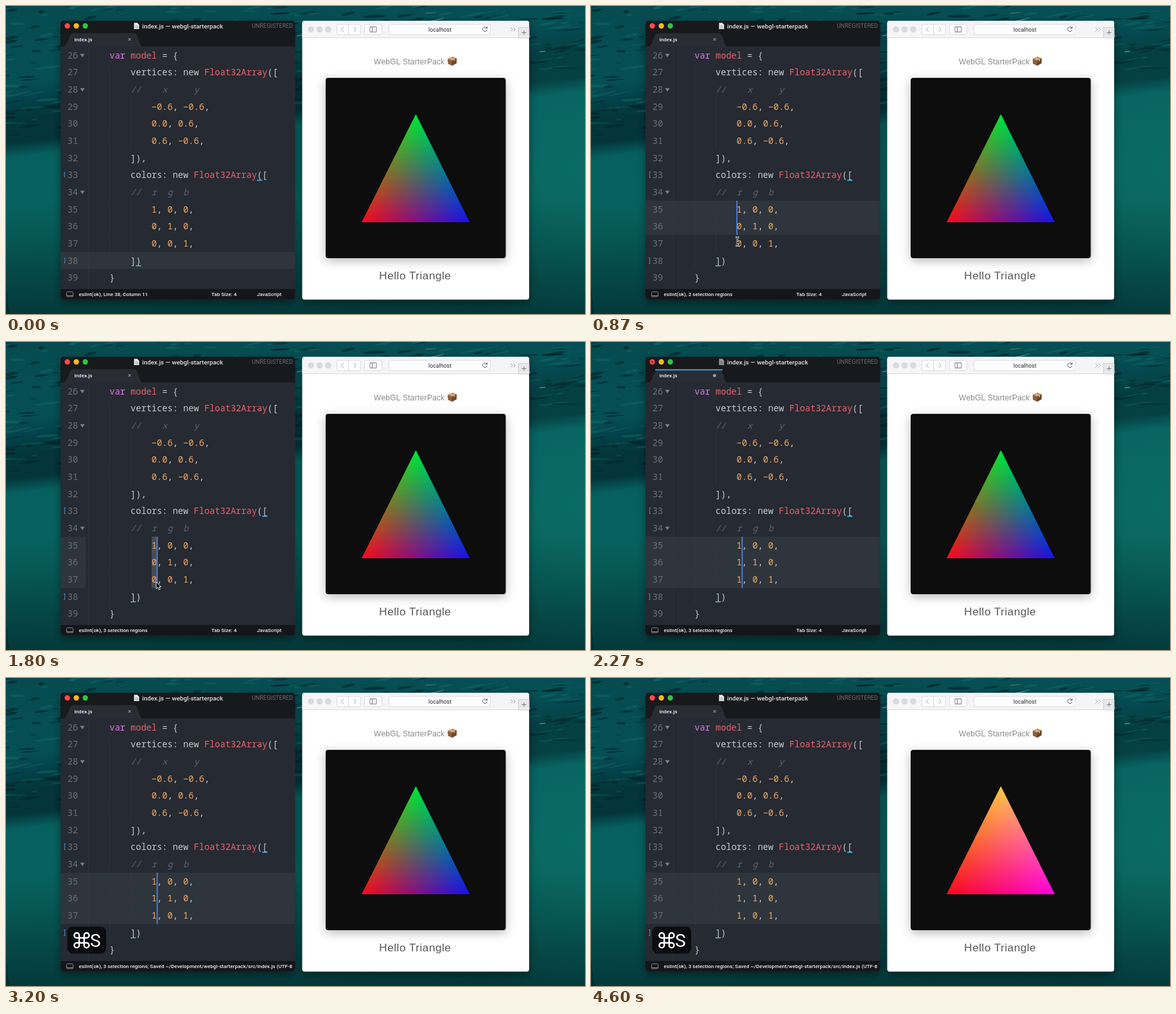
An HTML page with a canvas that plays this animation: 902 by 480 pixels, repeating every 4670 ms.

```html
<!DOCTYPE html>
<html lang="en">
<head>
<meta charset="utf-8">
<title>Hello Triangle</title>
<style>
  html, body { margin: 0; width: 902px; height: 480px; overflow: hidden; background: #043b40; }
  canvas, svg { position: absolute; left: 0; top: 0; }
  .gl { left: 498px; top: 112px; }
  text { font-family: Roboto, sans-serif; white-space: pre; }
  .code text { font: 13.68px "Noto Sans Mono", monospace; fill: #c5c9d2; }
  .code .num { fill: #6c7079; }
  .code .var { fill: #dc7ae6; }
  .code .name { fill: #ee606b; }
  .code .lit { fill: #f3a963; }
  .code .note { fill: #60646d; font-style: italic; }
  .code .mark { fill: #4aa3dc; font-size: 10px; }
  .hl { fill: #2e353c; }
  .ui { font-size: 8.1px; font-weight: 500; fill: #eceef0; }
  .page { font-family: "Liberation Sans", Arial, sans-serif; }
</style>
</head>
<body>
<canvas id="sea" width="902" height="480"></canvas>
<svg id="stage" width="902" height="480" viewBox="0 0 902 480">
  <defs>
    <filter id="shadow" x="-20%" y="-20%" width="140%" height="140%">
      <feDropShadow dx="0" dy="5" stdDeviation="7" flood-color="#000" flood-opacity=".4"/>
    </filter>
    <filter id="soft" x="-20%" y="-20%" width="140%" height="140%">
      <feDropShadow dx="0" dy="4" stdDeviation="8" flood-color="#000" flood-opacity=".28"/>
    </filter>
    <clipPath id="win"><rect x="85" y="23" width="365.5" height="434.5" rx="5"/></clipPath>
    <clipPath id="bar"><rect x="85" y="441" width="361" height="17"/></clipPath>
  </defs>

  <!-- editor -->
  <rect x="85" y="23" width="365.5" height="434.5" rx="5" fill="#282a32" filter="url(#shadow)"/>
  <g clip-path="url(#win)">
    <rect x="85" y="23" width="366" height="40" fill="#18191d"/>
    <path d="M90 63C97 62 97 43 104 42.500H200C207 43 206 62 213 63Z" fill="#292c34"/>
    <path d="M100 43.300H205" stroke="#3fa9f0" stroke-width="1.800" data-on="2050-3000"/>
    <g id="code" class="code"></g>
    <rect x="85" y="441" width="366" height="17" fill="#15161a"/>
  </g>
  <circle cx="95.500" cy="31" r="4.200" fill="#fc4b48"/>
  <circle cx="95.500" cy="31" r="1.500" fill="#7d1412" data-on="2050-3000"/>
  <circle cx="109.500" cy="31" r="4.200" fill="#fdb827"/>
  <circle cx="123.500" cy="31" r="4.200" fill="#29c940"/>
  <g id="doc">
    <path d="M199.500 26.300H204.500L207.300 29.100V36H199.500Z" fill="#eef0f2"/>
    <path d="M201 30.300H205M201 32.300H206M201 34.300H206" stroke="#888b90" stroke-width=".8"/>
  </g>
  <text x="212" y="34.500" font-size="9.800" font-weight="500" fill="#dfe1e4">index.js — webgl-starterpack</text>
  <text x="383" y="34.300" font-size="9" fill="#6b6d72">UNREGISTERED</text>
  <text x="106.500" y="54.800" class="ui">index.js</text>
  <path d="M190.500 50L194.500 54M194.500 50L190.500 54" stroke="#b4b7bc" data-on="0-2050 3000-4670"/>
  <circle cx="192.500" cy="52.200" r="2.500" fill="#9a9da3" data-on="2050-3000"/>
  <rect x="94.500" y="445.500" width="10" height="7.500" rx="1" fill="none" stroke="#85888e"/>
  <path d="M95 451.500H104" stroke="#85888e"/>
  <g id="status" clip-path="url(#bar)"></g>

  <!-- browser -->
  <rect x="461.500" y="23" width="353.500" height="434.500" rx="4" fill="#fff" filter="url(#shadow)"/>
  <path d="M461.500 50V27A4 4 0 0 1 465.500 23H811A4 4 0 0 1 815 27V50Z" fill="#f5f4f6"/>
  <path d="M461.500 49.500H815" stroke="#dcdbdd"/>
  <g fill="#dad9db" stroke="#cccbcd" stroke-width=".6">
    <circle cx="475" cy="36.500" r="4.200"/><circle cx="488.500" cy="36.500" r="4.200"/><circle cx="502" cy="36.500" r="4.200"/>
  </g>
  <g fill="#fdfdfd" stroke="#dddce0">
    <rect x="515.500" y="28.500" width="37" height="16" rx="2.500"/>
    <rect x="558.500" y="28.500" width="27" height="16" rx="2.500"/>
    <rect x="596.500" y="28.500" width="158" height="16" rx="2.500"/>
    <path d="M533.500 29V44"/>
  </g>
  <g fill="none" stroke="#7d7d81">
    <path d="M526 33L522.500 36.500L526 40M542 33L545.500 36.500L542 40" stroke="#a2a2a6"/>
    <path d="M567 32.500H577V40.500H567ZM570.500 32.500V40.500"/>
    <path d="M749 34.300A3.500 3.500 0 1 0 749.500 37M749.500 32V34.800H746.700" stroke="#5d5d61"/>
    <path d="M786 33.500L789 36.500L786 39.500M790.500 33.500L793.500 36.500L790.500 39.500" stroke="#a2a2a6"/>
  </g>
  <path d="M798.500 50V33.500H815V50Z" fill="#e9e8ea" stroke="#d2d1d4"/>
  <path d="M803.500 41.500H810.500M807 38V45" stroke="#77777b"/>
  <rect id="load" x="597.500" y="43" height="1.800" fill="#3d9cf0" data-on="3450-4050"/>
  <text x="676" y="39.800" font-size="8.800" text-anchor="middle" fill="#2c2c2e">localhost</text>
  <text class="page" x="573" y="90.500" font-size="12" letter-spacing=".27" fill="#87888c">WebGL StarterPack</text>
  <path d="M688 82.500L695.500 79L702 81.500V89L695 93L688.500 90Z" fill="#8c5a38"/>
  <path d="M688 82.500L695.500 79L702 81.500L695 85.500Z" fill="#c69466"/>
  <path d="M695 85.500L702 81.500V89L695 93Z" fill="#6f4328"/>
  <path d="M691 81.200L698 84V86.500L699.300 85.700V83.200L692.700 80.400Z" fill="#e2c08f"/>
  <rect x="498" y="112" width="280.500" height="281" rx="4" fill="#08080b" filter="url(#soft)"/>
  <text class="page" x="581.300" y="426.300" font-size="17.200" letter-spacing=".5" fill="#56575b">Hello Triangle</text>
</svg>
<canvas class="gl" width="281" height="281" data-on="0-3620"></canvas>
<canvas class="gl" width="281" height="281" data-on="3620-4670"></canvas>
<svg width="902" height="480" viewBox="0 0 902 480">
  <g id="keys" data-on="2960-4670">
    <rect x="95.500" y="387.500" width="60.500" height="42" rx="8" fill="#08090b" fill-opacity=".9"/>
    <path transform="translate(102.500 393.500) scale(1.28)" fill="none" stroke="#fff" stroke-width="1.900"
      d="M18 3a3 3 0 0 0-3 3v12a3 3 0 1 0 3-3H6a3 3 0 1 0 3 3V6a3 3 0 1 0-3 3h12a3 3 0 0 0 0-6z"/>
    <text x="131" y="419" font-size="28" fill="#fff">S</text>
  </g>
  <g id="mouse">
    <path data-on="0-240 1400-2050" d="M0 0V10.500L2.500 8.300L4.300 12.200L6.100 11.400L4.400 7.600H7.600Z" fill="#000" stroke="#fff" stroke-width=".9"/>
    <g data-on="240-1400" fill="none">
      <path id="beam" d="M-3 -6.500Q0 -6.500 0 -4.500Q0 -6.500 3 -6.500M-3 6.500Q0 6.500 0 4.500Q0 6.500 3 6.500M0 -4.500V4.500M-1.500 1.800H1.500" stroke="#fff" stroke-width="2.400"/>
      <path d="M-3 -6.500Q0 -6.500 0 -4.500Q0 -6.500 3 -6.500M-3 6.500Q0 6.500 0 4.500Q0 6.500 3 6.500M0 -4.500V4.500M-1.500 1.800H1.500" stroke="#111"/>
    </g>
  </g>
</svg>

<script>
const LOOP = 4670, PRESS = 620, TWO = 790, THREE = 890, SELECT = 1300, TYPE = 2050, SAVE = 3000;
const $ = id => document.getElementById(id);
const colX = c => 161.2 + c * 8.208;
const rowY = r => 63.6 + r * 26.65;
const span = (a, b = LOOP) => `${a}-${b}`;

// Editor content
const tokens = [
  [/^\/\/.*/, 'note'], [/^var\b/, 'var'], [/^(model|Float32Array)/, 'name'],
  [/^−?\d[\d.]*/, 'lit'], [/^(\w+|[^\w])/, '']
];
function paint(s) {
  let out = '';
  while (s) {
    const [re, cls] = tokens.find(([re]) => re.test(s));
    const word = s.match(re)[0];
    out += cls ? `<tspan class="${cls}">${word}</tspan>` : word;
    s = s.slice(word.length);
  }
  return out;
}
const on = when => when ? ` data-on="${when}"` : '';
const line = (r, c, s, when) => `<text x="${colX(c)}" y="${rowY(r) + 18.1}"${on(when)}>${paint(s)}</text>`;
const box = (x, r, w, attrs, when) =>
  `<rect x="${x}" y="${rowY(r)}" width="${w}" height="26.7" ${attrs}${on(when)}/>`;
const under = (r, c, when) =>
  `<rect x="${colX(c)}" y="${rowY(r) + 24 - 16 + 0.3 + 0}" width="8.2" height="1.6" transform="translate(0 ${0})" fill="#4ab4e0"${on(when)}/>`
    .replace(/y="[^"]+"/, `y="${rowY(r) + 20.6}"`).replace(/ transform="[^"]+"/, '');

const source = [
  [0, 'var model = {'], [4, 'vertices: new Float32Array(['], [4, '//    x     y'],
  [8, '−0.6, −0.6,'], [8, '0.0, 0.6,'], [8, '0.6, −0.6,'], [4, ']),'],
  [4, 'colors: new Float32Array(['], [4, '//  r  g  b'],
  [8, '1, 0, 0,'], [8, ' , 1, 0,'], [8, ' , 0, 1,'], [4, '])'], [0, '}']
];
let code = box(85, 12, 366, 'class="hl"', span(0, PRESS));
[PRESS, TWO, THREE].forEach((start, i) => {
  const r = 9 + i;
  code += box(85, r, 366, 'class="hl"', `${span(start, SELECT)} ${span(TYPE)}`)
        + box(85, r, 39, 'class="hl"', span(SELECT, TYPE))
        + box(colX(8), r, 8.2, 'fill="#474c57"', span(SELECT, TYPE));
});
const guide = (x, r, n) => `<path d="M${x} ${rowY(r)}V${rowY(r + n)}" stroke="#3a3d46" stroke-dasharray="1 1"/>`;
code += guide(128.5, 0, 14.2) + guide(161.5, 1, 12) + guide(194.5, 3, 3) + guide(194.5, 9, 3);
source.forEach(([c, s], r) => {
  code += `<text class="num" x="95.7" y="${rowY(r) + 18.1}">${26 + r}</text>` + line(r, c, s);
});
for (const r of [0, 2, 8]) code += `<path d="M115.500 ${rowY(r) + 11}h7l-3.500 5.500z" fill="#7b7f88"/>`;
for (const r of [10, 11]) code += line(r, 8, '0', span(0, TYPE)) + line(r, 8, '1', span(TYPE));

// Matching brackets
[['(', ')', 1, span(0, PRESS)], ['[', ']', 0, span(PRESS)]].forEach(([open, close, k, when]) => {
  code += under(7, k ? 28 : 29, when) + under(12, k ? 5 : 4, when);
  [[7, open], [12, close]].forEach(([r, ch]) => {
    code += `<text class="mark" x="88.500" y="${rowY(r) + 16.3}"${on(when)}>${ch}</text>`;
  });
});

const caret = (r, c, when) => box(colX(c) - 0.4, r, 1.7, 'fill="#4f86e8"', when);
code += '<g id="carets">' + caret(12, 6, span(0, PRESS));
[PRESS, TWO, THREE].forEach((start, i) => {
  code += caret(9 + i, 8, span(start, SELECT)) + caret(9 + i, 9, span(SELECT));
});
$('code').innerHTML = code + '</g>';

// Status bar
const label = (x, s, when) => `<text class="ui" x="${x}" y="452.300"${on(when)}>${s}</text>`;
const saved = '; Saved ~/Development/webgl-starterpack/src/index.js (UTF-8)';
$('status').innerHTML =
  [['Line 38, Column 11', 0, PRESS], ['Line 35, Column 13', PRESS, TWO], ['2 selection regions', TWO, THREE],
   ['3 selection regions', THREE, SAVE], ['3 selection regions' + saved, SAVE, LOOP]]
    .map(([s, a, b]) => label(113.5, 'eslint(ok), ' + s, span(a, b))).join('')
  + label(320, 'Tab Size: 4', span(0, SAVE)) + label(390.7, 'JavaScript', span(0, SAVE));

// Water: tilted ripples above a smooth slope
function drawSea() {
  const g = $('sea').getContext('2d');
  let seed = 7;
  const rnd = () => (seed = seed * 16807 % 2147483647) / 2147483647;
  const fill = (grad, stops) => {
    stops.forEach(([p, c]) => grad.addColorStop(p, c));
    g.fillStyle = grad;
    g.fillRect(-50, -150, 1100, 800);
  };
  g.save();
  g.rotate(-0.115);
  fill(g.createLinearGradient(0, 0, 0, 590), [
    [0, '#064b50'], [0.2, '#055055'], [0.3, '#03363c'], [0.36, '#03343a'],
    [0.4, '#06605e'], [0.62, '#07645f'], [1, '#054b4b']
  ]);
  for (let i = 0; i < 520; i++) {
    const y = rnd() * 215 - 10, near = y / 215, k = rnd();
    g.fillStyle = k < 0.55 ? 'rgba(1,27,34,.55)' : k < 0.94 ? 'rgba(18,112,113,.4)' : 'rgba(150,195,190,.45)';
    g.beginPath();
    g.ellipse(rnd() * 960 - 20, y, 4 + rnd() * 16 * (0.5 + near), 0.5 + rnd() * 1.8, rnd() * 0.3 - 0.15, 0, 7);
    g.fill();
  }
  g.restore();
  fill(g.createLinearGradient(0, 300, 0, 480), [[0, 'rgba(3,38,42,0)'], [1, 'rgba(3,38,42,.6)']]);
  fill(g.createRadialGradient(900, 260, 20, 900, 260, 260), [[0, 'rgba(14,116,106,.45)'], [1, 'rgba(14,116,106,0)']]);
}

// Each vertex colour fades linearly to its opposite edge; the sum blends them
function drawTriangle(canvas, colors) {
  const g = canvas.getContext('2d');
  const pts = [[56, 225], [140.5, 56.5], [224.5, 225]];
  g.beginPath();
  pts.forEach(p => g.lineTo(...p));
  g.closePath();
  g.fillStyle = '#000';
  g.fill();
  g.globalCompositeOperation = 'lighter';
  pts.forEach(([x, y], i) => {
    const [ax, ay] = pts[(i + 1) % 3], [bx, by] = pts[(i + 2) % 3];
    const dx = bx - ax, dy = by - ay;
    const k = ((x - ax) * dx + (y - ay) * dy) / (dx * dx + dy * dy);
    const grad = g.createLinearGradient(ax + k * dx, ay + k * dy, x, y);
    grad.addColorStop(0, '#000');
    grad.addColorStop(1, colors[i]);
    g.fillStyle = grad;
    g.fill();
  });
}

drawSea();
const [before, after] = document.querySelectorAll('.gl');
drawTriangle(before, ['#fa081c', '#00e834', '#1412e8']);
drawTriangle(after, ['#f8081c', '#ffc846', '#ff00e1']);

// Timeline
const timed = [...document.querySelectorAll('[data-on]')].map(el =>
  [el, el.dataset.on.split(' ').map(s => s.split('-').map(Number))]);
const path = [
  [70, 250, 492], [560, 228, 317], [700, 228, 321], [870, 228, 367],
  [1000, 228, 372], [1350, 235, 374], [1700, 234, 374]
];
const clamp = v => Math.max(0, Math.min(1, v));
function mouseAt(t) {
  const i = Math.max(1, path.findIndex(p => p[0] >= t));
  if (t >= path[path.length - 1][0]) return path[path.length - 1].slice(1);
  const [a, b] = [path[i - 1], path[i]];
  const u = clamp((t - a[0]) / (b[0] - a[0])), e = u * u * (3 - 2 * u);
  return [a[1] + (b[1] - a[1]) * e, a[2] + (b[2] - a[2]) * e];
}
function render(t) {
  for (const [el, spans] of timed)
    el.style.display = spans.some(([a, b]) => t >= a && t < b) ? '' : 'none';
  const held = t >= PRESS && t < 1900;
  $('carets').style.display = held || (t + 950) % 1000 < 500 ? '' : 'none';
  $('doc').style.opacity = t >= TYPE && t < SAVE ? 0.6 : 1;
  $('keys').style.opacity = clamp((t - 2960) / 100);
  $('load').setAttribute('width', 156 * clamp((t - 3450) / 300));
  $('mouse').setAttribute('transform', `translate(${mouseAt(t)})`);
}
const start = performance.now();
function tick() {
  render((performance.now() - start) % LOOP);
  requestAnimationFrame(tick);
}
tick();
</script>
</body>
</html>
```
